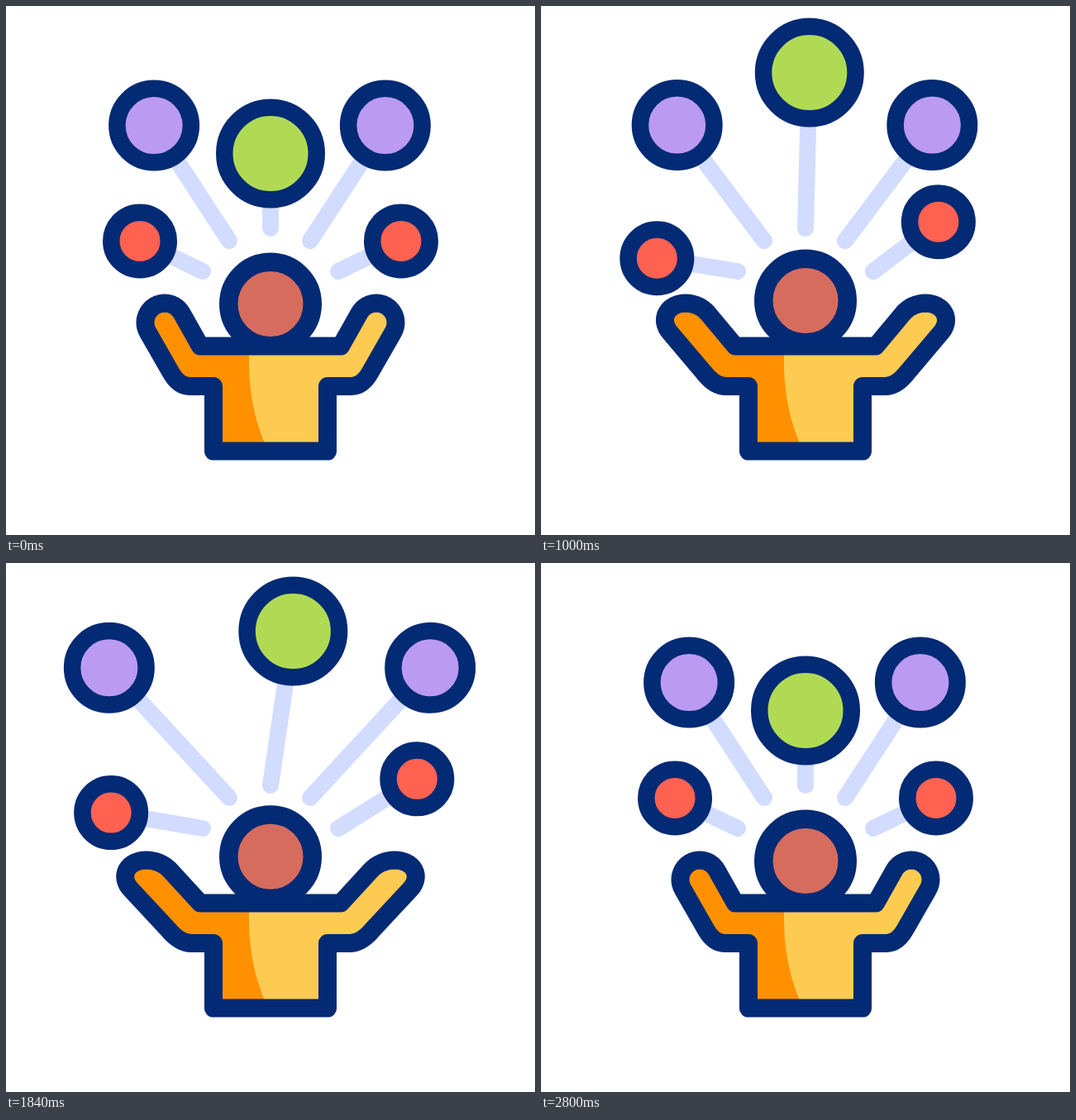
An HTML page for the animation above (3000 ms loop, 640x640 px).

```html
<!DOCTYPE html>
<html lang="en">
<head>
<meta charset="utf-8">
<title>Juggler</title>
<style>
  html, body { margin: 0; width: 100%; height: 100%; overflow: hidden; background: #fff; }
  svg { display: block; width: 100vw; height: 100vh; }
</style>
</head>
<body>
<svg viewBox="0 0 640 640">
  <defs><clipPath id="bodyClip"><path id="clipShape"/></clipPath></defs>
  <g id="sticks" stroke="#d2dcff" stroke-width="20" stroke-linecap="round"></g>
  <g id="balls" stroke="#032a74" stroke-width="20.5"></g>
  <circle id="head" cx="320" r="50.75" fill="#d56c5e" stroke="#032a74" stroke-width="22.5"/>
  <path id="shirt" fill="#fdcb52"/>
  <path d="M100 340H294V422C293 470 302 505 317 539V560H100Z" fill="#ff9100" clip-path="url(#bodyClip)"/>
  <path id="outline" fill="none" stroke="#032a74" stroke-width="22" stroke-linejoin="round"/>
</svg>
<script>
const LOOP = 3000;
const $ = id => document.getElementById(id);

function set(el, attrs) {
  for (const name in attrs) el.setAttribute(name, attrs[name]);
}
function add(parent, tag, attrs) {
  const el = document.createElementNS("http://www.w3.org/2000/svg", tag);
  set(el, attrs);
  return parent.appendChild(el);
}

// Eased step from 0 to 1, and an eased rise and fall
function ramp(t, from, to) {
  const u = Math.min(1, Math.max(0, (t - from) / (to - from)));
  return u * u * (3 - 2 * u);
}
const bump = (t, from, peak, to) => ramp(t, from, peak) - ramp(t, peak, to);

// A ball on a stick that starts at (x, y); pose gives [reach, degrees from vertical]
function makeBall(x, y, r, fill, pose) {
  const stick = add($("sticks"), "line", { x1: x, y1: y });
  const ball = add($("balls"), "circle", { r, fill });
  return t => {
    const [reach, degrees] = pose(t);
    const a = degrees * Math.PI / 180;
    const cx = x + reach * Math.sin(a), cy = y - reach * Math.cos(a);
    set(stick, { x2: cx, y2: cy });
    set(ball, { cx, cy });
  };
}

function redPose(t, side) {
  const reach = 38.5 * (bump(t, 0, 560, 1320) + bump(t, 1320, 2110, 2800));
  const sway = 6.5 * bump(t, 0, 560, 560.01) + 6.5 * (ramp(t, 560, 560.01) - ramp(t, 2230, 2800))
    - 21 * (bump(t, 560, 970, 1310) + bump(t, 1310, 1710, 2230));
  return [84.3 + reach, side * (64.3 + reach * .172) + sway];
}

function purplePose(t, side) {
  const reach = 53 * bump(t, 0, 400, 1210) + 51 * bump(t, 1210, 1960, 2700);
  const spread = 12.9 * bump(t, 0, 370, 780) + 5 * bump(t, 0, 800, 1450)
    + 16.2 * bump(t, 1520, 2090, 2440);
  return [166.4 + reach, side * (33.1 + spread)];
}

function greenPose(t) {
  const reach = 98 * (ramp(t, 110, 600) - ramp(t, 2150, 2770));
  const sway = 15 * bump(t, 0, 590, 1400) - 11.5 * bump(t, 590, 1400, 2140)
    + 19.4 * bump(t, 1400, 2140, 2770);
  return [90.5 + reach, sway];
}

const sides = [-1, 1];
const balls = [
  ...sides.map(side => makeBall(320 + 82 * side, 321, 34.75, "#ff6250", t => redPose(t, side))),
  ...sides.map(side => makeBall(319 + 49 * side, 284, 44.75, "#bb9af1", t => purplePose(t, side))),
  makeBall(320, 269, 55.75, "#b1da54", greenPose)
];

// The hand is a half circle; spreading the arm shears it away from the shoulder
function bodyPath(spread) {
  const shoulder = [235, 411.5];
  const shear = ([x, y]) =>
    [x + spread * (.42 * (x - shoulder[0]) + .31 * (y - shoulder[1])), y];
  const hand = Array.from({ length: 25 }, (_, i) => {
    const a = -Math.PI * (1 / 6 + i / 24);
    return shear([192 + 23.5 * Math.cos(a), 383 + 23.5 * Math.sin(a)]);
  });
  const elbow = shear([199.6, 443.6]);
  const bend = [209 + 2 * spread, 460], armpit = [222 + 3 * spread, 460];
  const flip = ([x, y]) => [640 - x, y];
  return `M${shoulder}L${hand.join("L")}L${elbow}Q${bend} ${armpit}H251V538.6H389V460` +
    `L${flip(armpit)}Q${flip(bend)} ${flip(elbow)}` +
    `L${hand.map(flip).reverse().join("L")}L${flip(shoulder)}Z`;
}

function draw(t) {
  balls.forEach(update => update(t));
  const spread = bump(t, 0, 420, 1580) + .77 * bump(t, 1270, 2030, 2800);
  set($("head"), { cy: 360.5 - 8 * spread });
  const d = bodyPath(spread);
  for (const id of ["clipShape", "shirt", "outline"]) set($(id), { d });
}

const start = performance.now();
function tick() {
  draw((performance.now() - start) % LOOP);
  requestAnimationFrame(tick);
}
draw(0);
requestAnimationFrame(tick);
</script>
</body>
</html>
```
